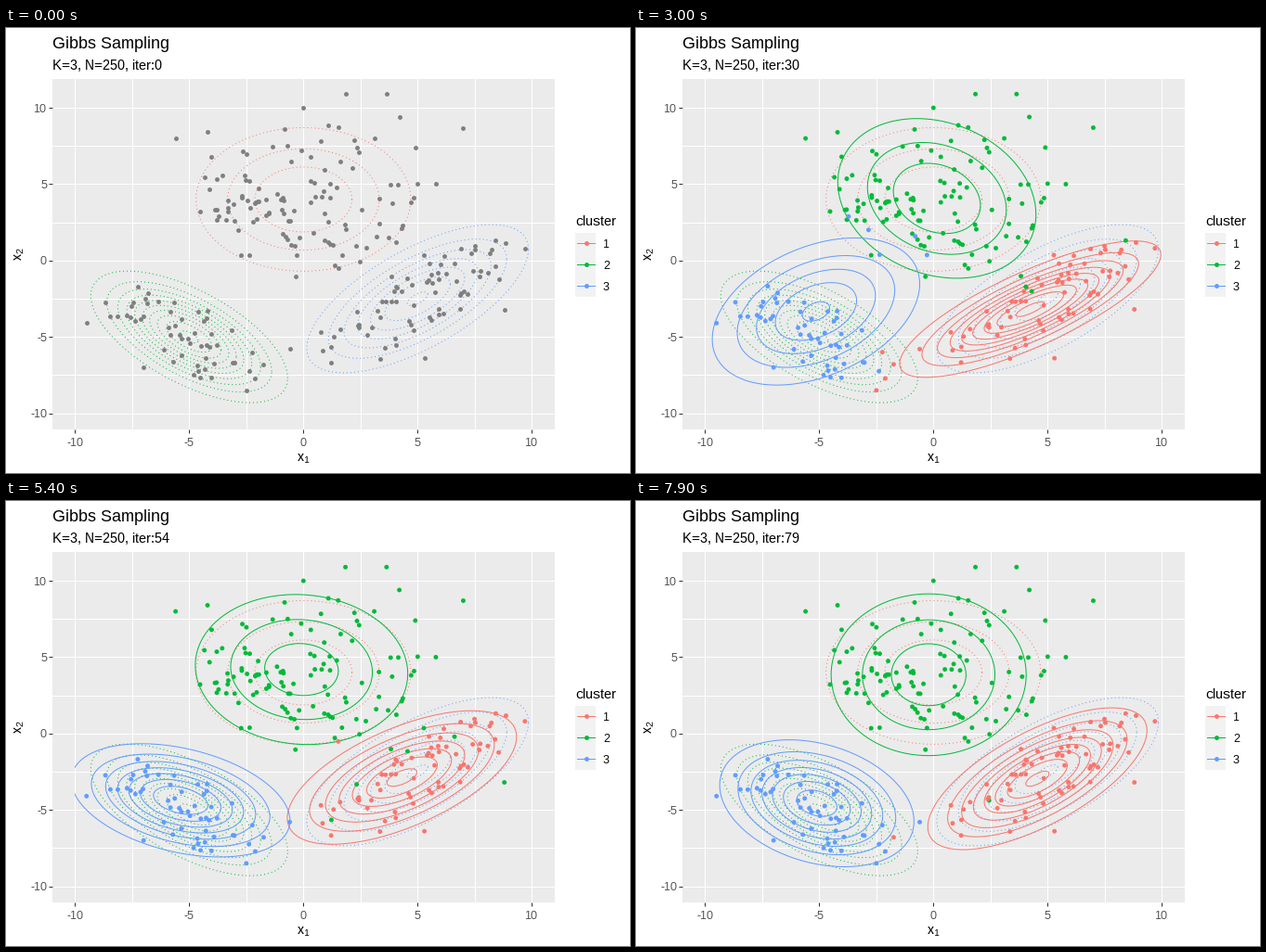
Recreate the animation shown at these times as a matplotlib script. Size 672 by 480 pixels, loop 8 s.

```python
import numpy as np
import matplotlib.pyplot as plt
from matplotlib.animation import FuncAnimation
from matplotlib.collections import LineCollection
from matplotlib.patches import Rectangle

plt.rcParams.update({
    "font.family": "Liberation Sans",
    "mathtext.fontset": "custom",
    "mathtext.rm": "Liberation Sans",
    "text.hinting": "default",
    "text.hinting_factor": 1,
})

W, H, DPI = 672, 480, 96
LEFT, RIGHT, TOP, BOTTOM = 49.8, 590.8, 54.65, 432.65
XLIM, YLIM = (-11, 11), (-11.04, 11.91)
PX = 72 / DPI  # one pixel in points
COLORS = np.array(["#F8766D", "#00BA38", "#619CFF"])
GREY = "#4D4D4D"
STEP = 0.005  # density between contour levels
N_ITER = 80

# A cluster is: mean x, mean y, sd x, sd y, correlation
TRUTH = np.array([
    (0, 4, 8 ** 0.5, 8 ** 0.5, 0),
    (-5, -5, 2, 2, -0.625),
    (5, -2.5, 6 ** 0.5, 6 ** 0.5, 2 / 3),
])
WEIGHTS = np.array([0.30, 0.47, 0.23])

# The chain drifts from a mixed state through a halfway one to the settled one
MIXED = [(3.5, -3.3, 2.76, 1.94, 0.75), (0.7, 3.2, 3.22, 3.26, -0.43), (-4.4, -1.0, 2.29, 4.42, 0.65)]
HALFWAY = [(4.0, -3.3, 2.87, 1.95, 0.78), (0.3, 4.1, 2.61, 2.98, -0.21), (-5.1, -3.7, 2.51, 2.60, 0.33)]
SETTLED = [(4.46, -2.85, 2.61, 2.19, 0.63), (-0.27, 3.93, 2.76, 3.17, 0), (-5.3, -4.57, 2.04, 2.12, -0.34)]
PHASES = np.array([MIXED, HALFWAY, SETTLED])
PHASE_ITERS = (17, 30, 45)

EXTREMES = np.array([
    (1.84, 10.9), (3.64, 10.9), (7.0, 8.7), (4.2, 9.4), (0, 10), (-5.6, 8),
    (-4.2, 8.4), (5.8, 5), (4.9, 7.4), (-9.5, -4.1), (-2.5, -8.5), (9.7, 0.8),
    (8.8, -3.2), (5.3, -6.4), (-7, -7), (-0.6, -5.8),
])


def cov(p):
    sx, sy, rho = p[2:]
    return np.array([[sx * sx, rho * sx * sy], [rho * sx * sy, sy * sy]])


def peak(p):
    return 1 / (2 * np.pi * np.sqrt(np.linalg.det(cov(p))))


def density(pts, p):
    d = pts - p[:2]
    return peak(p) * np.exp(-0.5 * np.sum(d @ np.linalg.inv(cov(p)) * d, axis=1))


ANGLE = np.linspace(0, 2 * np.pi, 181)
CIRCLE = np.column_stack([np.cos(ANGLE), np.sin(ANGLE)])


def contours(params):
    """Ellipses where each normal density crosses a multiple of STEP."""
    segs, cols = [], []
    for p, c in zip(params, COLORS):
        shape = CIRCLE @ np.linalg.cholesky(cov(p)).T
        top = peak(p)
        for level in np.arange(STEP, top, STEP):
            segs.append(p[:2] + np.sqrt(2 * np.log(top / level)) * shape)
            cols.append(c)
    return segs, cols


def make_points():
    """Normal draws without their far tails, plus the extremes."""
    rng = np.random.default_rng(24)
    parts = [EXTREMES]
    for p, n in zip(TRUTH, (110, 53, 71)):
        z = rng.normal(size=(4 * n, 2))
        z = z[np.hypot(*z.T) < 1.85][:n]
        parts.append(p[:2] + z @ np.linalg.cholesky(cov(p)).T)
    return np.vstack(parts)


def sample_params(it):
    i = np.interp(it, PHASE_ITERS, range(len(PHASES)))
    lo = min(int(i), len(PHASES) - 2)
    p = PHASES[lo] + (i - lo) * (PHASES[lo + 1] - PHASES[lo])
    rng = np.random.default_rng(it)
    wander = 1 + np.exp(-it / 8)
    p[:, :2] += wander * rng.normal(0, 0.15, (3, 2))
    p[:, 2:4] *= np.exp(rng.normal(0, 0.06, (3, 2)))
    p[:, 4] = np.clip(p[:, 4] + wander * rng.normal(0, 0.07, 3), -0.8, 0.8)
    return p


def sample_labels(it, params):
    prob = np.array([w * density(points, p) for w, p in zip(WEIGHTS, params)])
    cum = np.cumsum(prob / prob.sum(axis=0), axis=0)
    u = np.random.default_rng(1000 + it).random(len(points))
    return np.minimum((u > cum).sum(axis=0), 2)


points = make_points()

fig = plt.figure(figsize=(W / DPI, H / DPI), dpi=DPI, facecolor="white")

# Panel
ax = fig.add_axes([LEFT / W, 1 - BOTTOM / H, (RIGHT - LEFT) / W, (BOTTOM - TOP) / H])
ax.set(xlim=XLIM, ylim=YLIM, facecolor="#EBEBEB")
ax.spines[:].set_visible(False)
major, minor = np.arange(-10, 11, 5), np.arange(-7.5, 8, 5)
for axis in (ax.xaxis, ax.yaxis):
    axis.set_ticks(major, labels=[""] * len(major))
    axis.set_ticks(minor, minor=True)
ax.set_axisbelow(True)
ax.grid(which="both", color="white", lw=PX)
ax.tick_params(which="major", length=2.75, width=PX, color="#333333")
ax.tick_params(which="minor", length=0)

# Pixel layer for text and legend
ui = fig.add_axes([0, 0, 1, 1])
ui.set(xlim=(0, W), ylim=(H, 0))
ui.axis("off")


def put(x, y, s, size, color="black", ha="left", va="baseline", **kw):
    return ui.text(x, y, s, fontsize=size, color=color, ha=ha, va=va, **kw)


put(50, 22, "Gibbs Sampling", 13.2)
subtitle = put(50, 45, "", 11)
for v in major:
    put(np.interp(v, XLIM, (LEFT, RIGHT)), 451, str(v), 8.8, GREY, "center")
    put(44, np.interp(v, YLIM, (BOTTOM, TOP)) + 4.5, str(v), 8.8, GREY, "right")
put(320.5, 464.5, r"$\mathrm{x}_\mathrm{1}$", 11, ha="center", va="center")
put(15, 243, r"$\mathrm{x}_\mathrm{2}$", 11, ha="center", va="center", rotation=90)

put(613, 213, "cluster", 11)
ui.add_patch(Rectangle((613, 221), 22, 69, fc="#F2F2F2", ec="none"))
for k, c in enumerate(COLORS):
    y = 232.4 + 23 * k
    ui.plot([615, 634], [y, y], color=c, lw=PX)
    ui.plot(624.5, y, "o", color=c, ms=4.9 * PX, mew=0)
    put(643, y + 5, str(k + 1), 8.8)

# Contours and observations
segs, cols = contours(TRUTH)
ax.add_collection(LineCollection(segs, colors=cols, linewidths=PX,
                                 linestyles=[(0, (1, 3))], zorder=2), autolim=False)
rings = LineCollection([], linewidths=PX, zorder=3)
ax.add_collection(rings, autolim=False)
rings.set_clip_path(Rectangle((-10, -10), 20, 21, transform=ax.transData))
dots = ax.scatter(*points.T, s=(4.9 * PX) ** 2, linewidths=0, zorder=4)
ax.set(xlim=XLIM, ylim=YLIM)


def update(it):
    subtitle.set_text(f"K=3, N=250, iter:{it}")
    if it == 0:
        rings.set_segments([])
        dots.set_facecolor("#7F7F7F")
    else:
        params = sample_params(it)
        segs, cols = contours(params)
        rings.set_segments(segs)
        rings.set_color(cols)
        dots.set_facecolor(COLORS[sample_labels(it, params)])
    return subtitle, rings, dots


anim = FuncAnimation(fig, update, frames=N_ITER, interval=100, repeat=True, repeat_delay=0)
plt.show()
```
